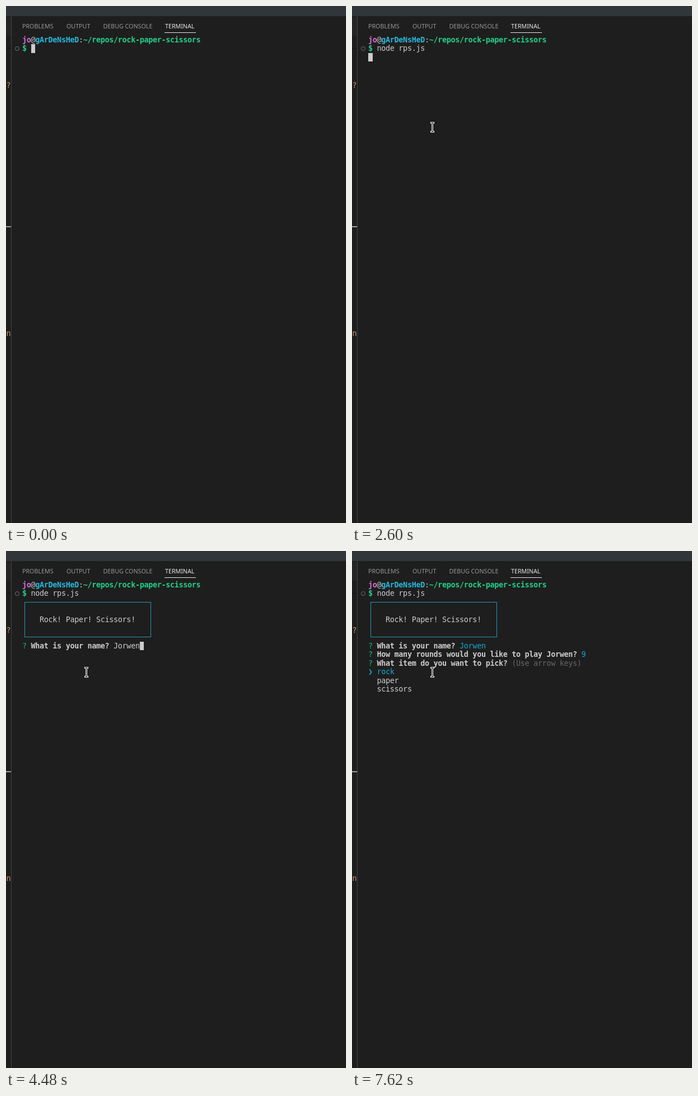
These frames come from a looping animation (607x923 px, 8000 ms). An HTML page:

```html
<!DOCTYPE html>
<html lang="en">
<head>
<meta charset="utf-8">
<title>Terminal game</title>
<style>
  :root { --cell: 7.77px; --row: 15.56px; }
  html, body { margin: 0; width: 100%; height: 100%; overflow: hidden; background: #1e1e1e; }
  #stage { position: relative; width: 607px; height: 923px; overflow: hidden; background: #1e1e1e; }
  #stage > * { position: absolute; }

  .titlebar { left: 0; top: 0; width: 607px; height: 18px; background: #31363b; }
  .divider { left: 9px; top: 18px; width: 1px; height: 905px; background: #444; }
  .tab-edge { left: 0; top: 20px; width: 9px; height: 33px; background: #252526; }
  .dark-dash { left: 0; top: 75px; width: 9px; height: 1px; background: #111; }
  .light-dash { left: 0; top: 393px; width: 9px; height: 2px; background: #a0a0a0; }

  .code, #term { font: 13.4px/var(--row) "DejaVu Sans Mono", monospace; letter-spacing: calc(var(--cell) - .602em); }
  .code { left: .5px; color: #ce9178; }

  .tab { top: 28px; font: 10.69px/16px "Noto Sans", sans-serif; color: #979797; white-space: nowrap; }
  .tab.on { color: #e7e7e7; }
  .underline { left: 283px; top: 47px; width: 56px; height: 1px; background: #e7e7e7; }
  .status { left: 16px; top: 72px; width: 6px; height: 6px; border: 1px solid #6f6f6f; border-radius: 50%; }

  #term { left: 29px; top: 52.6px; margin: 0; white-space: pre; color: #ccc; }
  #term b { font-weight: 700; }
  #term i { display: inline-block; width: var(--cell); height: var(--row); vertical-align: top; background: #ccc; }
  .user { color: #d670d6; }
  .host { color: #29b8db; }
  .path { color: #23d18b; }
  .ask { color: #0dbc79; }
  .cyan { color: #11a8cd; }
  .dim { color: #666; }
  .arrow { display: inline-block; width: calc(2 * var(--cell)); height: var(--row); vertical-align: top; }

  #banner { left: 33px; top: 91px; width: 224px; height: 61px; border: 1px solid #2398b8; }
  #pointer { left: 0; top: 0; width: 7px; height: 19px; overflow: visible; }
</style>
</head>
<body>
<div id="stage">
  <div class="titlebar"></div>
  <div class="tab-edge"></div>
  <div class="dark-dash"></div>
  <div class="light-dash"></div>
  <div class="code" style="top:134px">?</div>
  <div class="code" style="top:577px">n</div>
  <div class="divider"></div>

  <div class="tab" style="left:29px">PROBLEMS</div>
  <div class="tab" style="left:108px">OUTPUT</div>
  <div class="tab" style="left:173.5px">DEBUG CONSOLE</div>
  <div class="tab on" style="left:284px">TERMINAL</div>
  <div class="underline"></div>
  <div class="status"></div>

  <pre id="term"></pre>
  <div id="banner"></div>
  <svg id="pointer" viewBox="0 0 7 19" fill="none">
    <path d="M0 1.5H7M0 17.5H7M3.5 1.5V17.5" stroke="#fff" stroke-width="3"/>
    <path d="M1 1.5H6M1 17.5H6M3.5 1.5V17.5" stroke="#111" stroke-width="1"/>
  </svg>
</div>
<script>
  const LOOP = 8000;
  const NAME = 'Jorwen';
  const CURSOR = '<i></i>';

  const term = document.getElementById('term');
  const banner = document.getElementById('banner');
  const pointer = document.getElementById('pointer');

  const span = (cls, text) => `<span class="${cls}">${text}</span>`;
  const bold = (cls, text) => `<b class="${cls}">${text}</b>`;
  const ask = (question, answer = '') => `${span('ask', '?')} ${bold('', question)} ${answer}`;

  const prompt = bold('user', 'jo') + '@' + bold('host', 'gArDeNsHeD') + ':' +
    bold('path', '~/repos/rock-paper-scissors') + '\n' + bold('path', '$') + ' ';
  const started = prompt + 'node rps.js\n';
  const intro = started + '\n\n    Rock! Paper! Scissors!\n\n\n';

  const nameLine = answer => intro + ask('What is your name?', answer);
  const named = nameLine(span('cyan', NAME)) + '\n';
  const roundsLine = answer => named + ask(`How many rounds would you like to play ${NAME}?`, answer);
  const menu = '\n' + ask('What item do you want to pick?', span('dim', '(Use arrow keys)')) +
    '\n' + span('cyan', '<span class="arrow">❯</span>rock') + '\n  paper\n  scissors';

  const typed = n => nameLine(NAME.slice(0, n) + CURSOR);

  const screens = [
    [0, prompt + CURSOR],
    [1710, prompt + 'clear' + CURSOR],
    [2050, prompt + 'node rps.js' + CURSOR],
    [2600, started + CURSOR],
    [2850, nameLine(span('dim', '(Player1)') + ' ' + CURSOR)],
    [4000, typed(1)],
    [4240, typed(2)],
    [4320, typed(3)],
    [4400, typed(4)],
    [4480, typed(6)],
    [5150, roundsLine(span('dim', '(5)') + ' ' + CURSOR)],
    [6870, named + CURSOR],
    [6980, roundsLine('9' + CURSOR)],
    [7620, roundsLine(span('cyan', '9')) + menu]
  ];

  // The pointer slides in from the right in eight discrete moves.
  const MOVE = { start: 350, end: 880, steps: 7, from: [554, 337], to: [140, 207] };

  function placePointer(t) {
    pointer.style.visibility = t < MOVE.start ? 'hidden' : 'visible';
    const raw = Math.min(1, Math.max(0, (t - MOVE.start) / (MOVE.end - MOVE.start)));
    const p = Math.floor(raw * MOVE.steps + 1e-6) / MOVE.steps;
    const ease = 1 - (1 - p) ** 2;
    const [x, y] = MOVE.from.map((a, i) => Math.round(a + (MOVE.to[i] - a) * ease));
    pointer.style.transform = `translate(${x}px, ${y}px)`;
  }

  let shown = -1;
  function draw() {
    const t = performance.now() % LOOP;
    const index = screens.findLastIndex(([at]) => at <= t);
    if (index !== shown) {
      shown = index;
      term.innerHTML = screens[index][1];
      banner.style.visibility = t >= 2850 ? 'visible' : 'hidden';
    }
    placePointer(t);
    requestAnimationFrame(draw);
  }
  draw();
</script>
</body>
</html>
```
